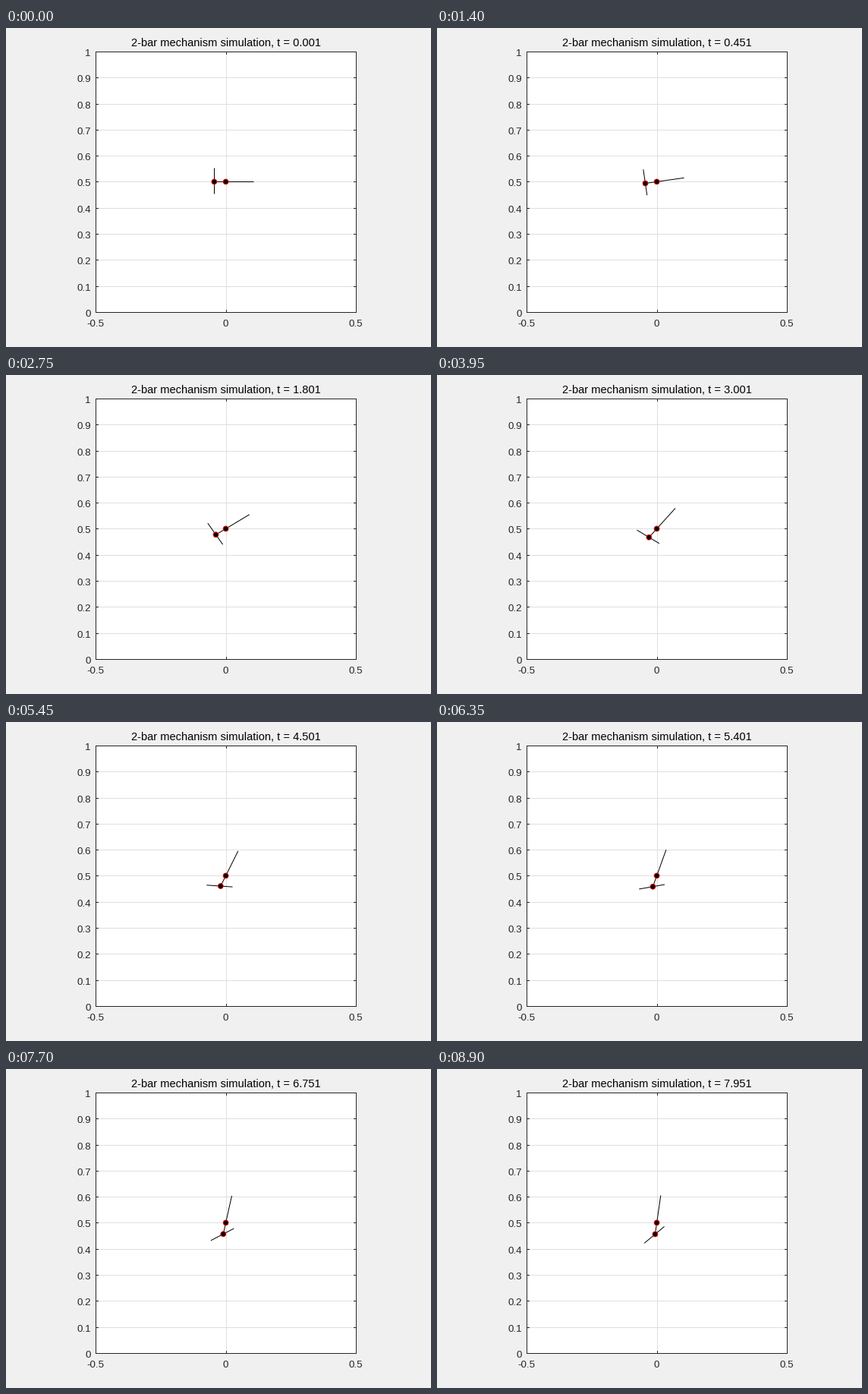
Write a matplotlib script that moves like this. It is 560 px wide and 420 px high and loops after 8.95 s.

```python
import numpy as np
import matplotlib.pyplot as plt
from matplotlib.animation import FuncAnimation
from matplotlib.patches import Circle, Rectangle

W, H, DPI = 560, 420, 80
PT = 72 / DPI                     # points per pixel
STEP_MS, FRAMES, HOLD = 50, 179, 19
LEFT, TOP, SCALE = 118.2, 31.0, 342.8
TICK = 3
INK = "#262626"

# Distances from the joints to the bar ends
ARM, TAIL = 0.106, 0.0445
LONG, SHORT = 0.054, 0.046

plt.rcParams["font.family"] = "Liberation Sans"


def to_px(x, y):
    return LEFT + (x + 0.5) * SCALE, TOP + (1 - y) * SCALE


def rates(q):
    """Angular speeds of two heavily damped bars under gravity."""
    w1 = 0.313 * np.cos(q[0]) - 0.0085 * np.cos(q[1])
    return np.array([w1, w1 - 0.14 * np.cos(q[1])])


def simulate(count, dt, sub=10):
    q = np.array([0.0, np.pi / 2])
    h = dt / sub
    poses = [q]
    for _ in range(count - 1):
        for _ in range(sub):
            q = q + h * rates(q + h / 2 * rates(q))
        poses.append(q)
    return poses


def line(xs, ys, color, z, cap="projecting"):
    return ax.plot(xs, ys, color=color, lw=PT, zorder=z,
                   solid_capstyle=cap)[0]


def label(x, y, s, ha, px=13.33, color=INK):
    return ax.text(x, y, s, ha=ha, va="baseline", fontsize=px * PT,
                   color=color, zorder=6)


def joint(x, y):
    return ax.add_patch(Circle((x, y), 3.4, fc="black", ec="red",
                               lw=0.9 * PT, zorder=5))


fig = plt.figure(figsize=(W / DPI, H / DPI), dpi=DPI, facecolor="#f0f0f0")
ax = fig.add_axes([0, 0, 1, 1])
ax.set_xlim(0, W)
ax.set_ylim(H, 0)
ax.axis("off")

# Whole pixels; straight lines snap to the centre of their pixel
x0, y0 = np.round(to_px(-0.5, 1))
x1, y1 = np.round(to_px(0.5, 0))
ax.add_patch(Rectangle((x0, y0), x1 - x0, y1 - y0, fc="white", ec="none",
                       zorder=0))

for k in range(11):
    y = np.round(to_px(0, k / 10)[1])
    if 0 < k < 10:
        line([x0, x1], [y, y], "#dfdfdf", 1)
    for a, b in ((x0, x0 + TICK), (x1, x1 - TICK)):
        line([a, b], [y, y], INK, 2)
    label(111.7, y + 6, f"{k / 10:g}", "right")

for v in (-0.5, 0, 0.5):
    x = np.round(to_px(v, 0)[0])
    if v == 0:
        line([x, x], [y0, y1], "#dfdfdf", 1)
    for a, b in ((y0, y0 + TICK), (y1, y1 - TICK)):
        line([x, x], [a, b], INK, 2)
    label(to_px(v, 0)[0], 393, f"{v:g}", "center")

line([x0, x1, x1, x0, x0], [y0, y0, y1, y1, y0], INK, 3)

pivot = np.array([0, 0.5])
title = label(289.6, 24, "", "center", 14.67, "black")
bar1 = line([], [], "black", 4, "butt")
bar2 = line([], [], "black", 4, "butt")
joint(*to_px(*pivot))
elbow = joint(*to_px(*pivot))

poses = simulate(FRAMES - HOLD, STEP_MS / 1000)


def direction(angle):
    return np.array([np.cos(angle), np.sin(angle)])


def set_bar(bar, p, q):
    bar.set_data(*zip(to_px(*p), to_px(*q)))


def update(i):
    n = max(0, i - HOLD)
    u1, u2 = map(direction, poses[n])
    knee = pivot - TAIL * u1
    set_bar(bar1, knee, pivot + ARM * u1)
    set_bar(bar2, knee + LONG * u2, knee - SHORT * u2)
    elbow.center = to_px(*knee)
    t = 0.001 + n * STEP_MS / 1000
    title.set_text(f"2-bar mechanism simulation, t = {t:.3f}")
    return bar1, bar2, elbow, title


anim = FuncAnimation(fig, update, frames=FRAMES, interval=STEP_MS,
                     repeat=True, repeat_delay=0)
plt.show()
```
